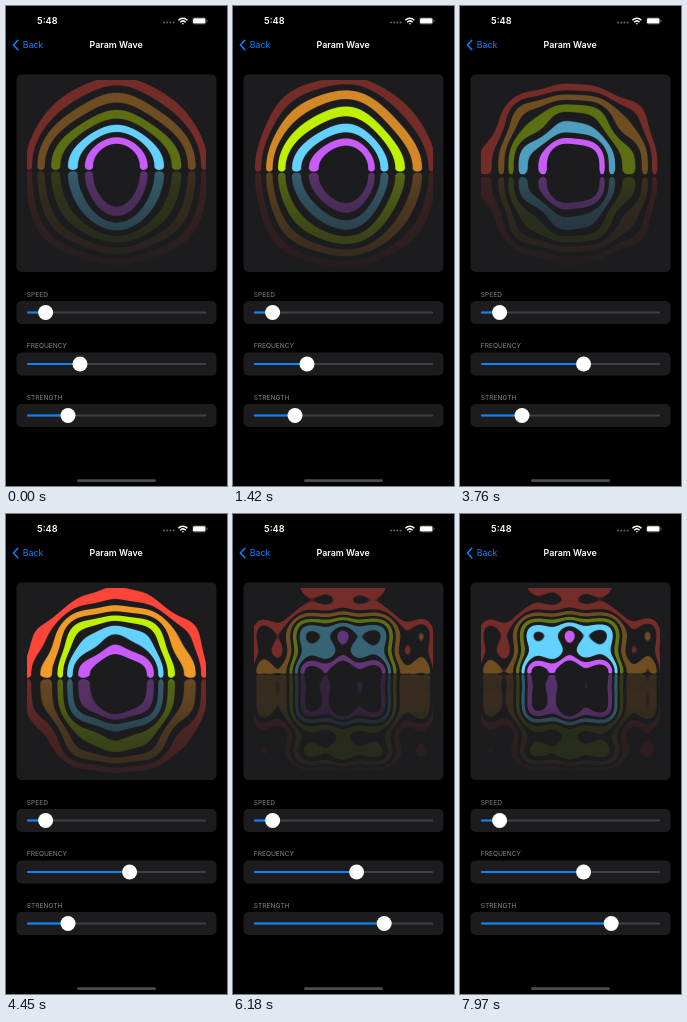
Write an HTML page with a canvas that moves like this. It is 221 px wide and 480 px high and loops after 8000 ms.

```html
<!DOCTYPE html>
<html lang="en">
<head>
<meta charset="utf-8">
<title>Param Wave</title>
<style>
  html, body { margin: 0; width: 100%; height: 100%; overflow: hidden; background: #000; }
  svg, canvas { position: absolute; display: block; }
  svg { left: 0; top: 0; width: 221px; height: 480px; font-family: Inter, Roboto, sans-serif; }
  canvas { left: 21px; top: 74px; width: 179px; height: 188px; }
</style>
</head>
<body>
<svg viewBox="0 0 221 480">
  <g fill="#fff" font-weight="600" text-anchor="middle">
    <text x="41.3" y="18.3" font-size="9.2">5:48</text>
    <text x="110.2" y="42.3" font-size="8.9">Param Wave</text>
  </g>
  <g fill="#666">
    <circle cx="158" cy="16.5" r="1"/><circle cx="161.2" cy="16.5" r="1"/>
    <circle cx="164.4" cy="16.5" r="1"/><circle cx="167.6" cy="16.5" r="1"/>
  </g>
  <g fill="none" stroke="#fff" stroke-width="1.5">
    <path d="M172.4 14.2a6.3 6.3 0 0 1 9 0M174.2 16.2a3.9 3.9 0 0 1 5.4 0"/>
    <path d="M175.6 17.2h2.6l-1.3 1.5z" fill="#fff" stroke="none"/>
  </g>
  <rect x="186.4" y="11.6" width="13.6" height="6.6" rx="2" fill="none" stroke="#555" stroke-width=".6"/>
  <rect x="187" y="12.2" width="12.4" height="5.4" rx="1.4" fill="#fff"/>
  <path d="M201 13.7v2.2" stroke="#666"/>
  <path d="M11.8 34.3L7.4 39l4.4 4.7" fill="none" stroke="#0a84ff" stroke-width="1.5" stroke-linecap="round" stroke-linejoin="round"/>
  <text x="16.8" y="42.2" font-size="8.8" fill="#0a84ff">Back</text>
  <rect x="10.5" y="68.5" width="200" height="197.5" rx="5" fill="#1c1c1e"/>
  <g id="sliders"></g>
  <rect x="71" y="473.2" width="79" height="2.8" rx="1.4" fill="#4c4c4c"/>
</svg>
<canvas id="wave" width="358" height="376"></canvas>
<script>
const LOOP = 8000, TAU = Math.PI * 2;
const clamp = (v, lo = 0, hi = 1) => Math.min(hi, Math.max(lo, v));
const mix = (a, b, k) => a + (b - a) * k;
const drag = (t, from, to) => {
  const k = clamp((t - from) / (to - from));
  return k * k * (3 - 2 * k);
};

// Sliders
const sliderGroup = document.getElementById('sliders');
function addSlider(label, top, x) {
  const g = document.createElementNS('http://www.w3.org/2000/svg', 'g');
  const y = top + 11.5;
  g.innerHTML = `
    <text x="20.8" y="${top - 4.2}" font-size="6.6" fill="#85858a">${label}</text>
    <rect x="10.5" y="${top}" width="200" height="23" rx="5" fill="#1c1c1e"/>
    <path d="M22 ${y}H199" stroke="#414145" stroke-width="2.2" stroke-linecap="round"/>
    <path class="fill" stroke="#0a84ff" stroke-width="2.2" stroke-linecap="round"/>
    <circle cy="${y}" r="7.5" fill="#fff"/>`;
  sliderGroup.append(g);
  const fill = g.querySelector('.fill'), thumb = g.querySelector('circle');
  const move = pos => {
    fill.setAttribute('d', `M22 ${y}H${pos}`);
    thumb.setAttribute('cx', pos);
  };
  move(x);
  return move;
}
addSlider('SPEED', 295, 39.6);
const moveFrequency = addSlider('FREQUENCY', 346.5, 74);
const moveStrength = addSlider('STRENGTH', 398, 62);

// Rainbow, innermost ring first, in stage pixels relative to the canvas
const RINGS = [[200, 92, 250], [100, 210, 255], [190, 240, 0], [240, 154, 40], [255, 69, 58]];
const SCALE = 2, W = 179, H = 188, SEAM = H / 2, CX = 89.4, CY = 89.5;
const INNER = 30.8, STEP = 13.68, HALF = 3.85, DIM = 0.39;
const ctx = document.getElementById('wave').getContext('2d');
const image = ctx.createImageData(W * SCALE, H * SCALE);
const data = image.data;
const cols = new Float32Array(W * SCALE);

// Rings light up one after another, hold, then go out in reverse
function ringOpacity(t) {
  const q = (t - 0.88 + 2.66) % 2.66;
  const lit = clamp(Math.min(7 * q, 5 - 7 * (q - 1.35)), 0, 5);
  return RINGS.map((_, i) => mix(DIM, 1, clamp(lit - i)));
}

// The rainbow and its reflection are bent together by one wave
function drawWave(frequency, strength, phase, opacity) {
  const w = W * SCALE, h = H * SCALE;
  for (let i = 0; i < w; i++) {
    const x = (i + 0.5) / SCALE;
    cols[i] = Math.abs(x + strength * Math.sin(x / W * frequency + phase) - CX);
  }
  for (let j = 0; j < h; j++) {
    const y = (j + 0.5) / SCALE;
    const bent = y + strength * Math.cos(y / H * frequency + phase);
    const depth = Math.abs(bent - SEAM);
    const dy = SEAM - depth - CY;
    const reflected = y > SEAM || bent > SEAM;
    const fade = reflected ? 0.36 * (1 - 0.75 * depth / SEAM) : 1;
    const visible = bent > 0 && bent < H;
    for (let i = 0; i < w; i++) {
      const dx = cols[i];
      const dist = dy < 0 ? Math.hypot(dx, dy) : dx;
      const n = clamp(Math.round((dist - INNER) / STEP), 0, 4);
      const off = dist - INNER - n * STEP;
      const gap = dy < 0 ? Math.abs(off) : Math.hypot(off, dy);
      const p = (j * w + i) * 4;
      for (let c = 0; c < 3; c++) data[p + c] = RINGS[n][c];
      data[p + 3] = visible ? 255 * fade * opacity[n] * clamp((HALF - gap) * 1.5 + 0.5) : 0;
    }
  }
  ctx.putImageData(image, 0, 0);
}

let start;
function tick(now) {
  start ??= now;
  const t = ((now - start) % LOOP) / 1000;
  const freq = drag(t, 2.9, 3.5), power = drag(t, 5.4, 6);
  moveFrequency(mix(74, 123.6, freq));
  moveStrength(mix(62, 151.2, power));
  const slow = 0.5 + 3.85 * t;
  const fast = 1 + 7.06 * (t - 7.97) + 7 * TAU;
  drawWave(mix(11.4, 23.5, freq), mix(3.6, 12.2, power), mix(slow, fast, freq), ringOpacity(t));
  requestAnimationFrame(tick);
}
requestAnimationFrame(tick);
</script>
</body>
</html>
```
